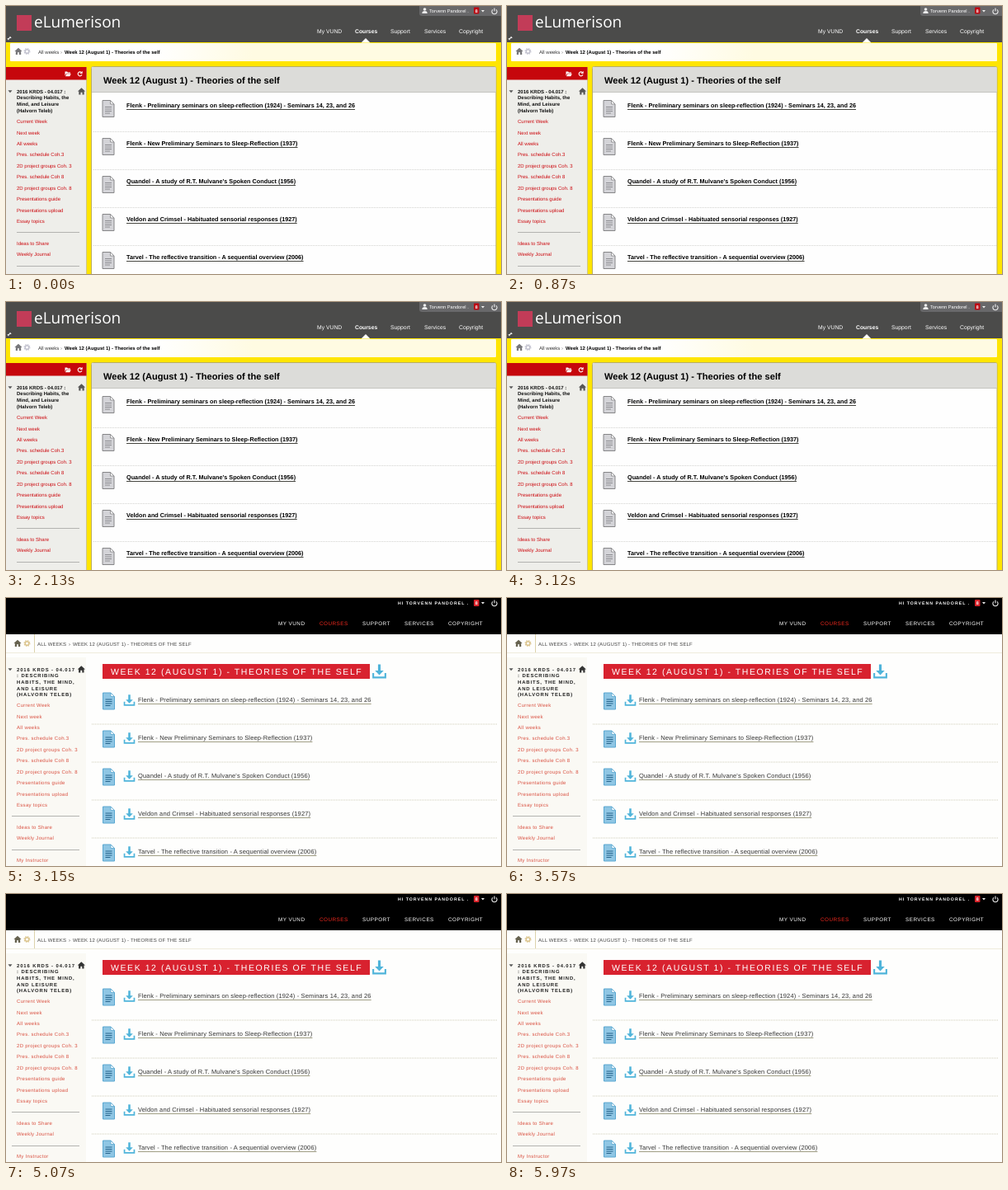
Write an HTML page that moves like this. It is 600 px wide and 325 px high and loops after 6.03 s.

```html
<!DOCTYPE html>
<html lang="en">
<head>
<meta charset="utf-8">
<title>Course page, two themes</title>
<style>
  html, body { margin: 0; width: 100%; height: 100%; overflow: hidden; background: #fff; }
  svg { display: block; width: 600px; height: 325px; }
  text { font-family: "Liberation Sans", Arial, sans-serif; text-rendering: geometricPrecision; white-space: pre; }
  .logo { font-family: "Open Sans", sans-serif; }
</style>
</head>
<body>
<svg id="stage" viewBox="0 0 600 325">
  <defs>
    <linearGradient id="crumbs"><stop offset=".3" stop-color="#fff"/><stop offset=".5" stop-color="#fffbe2"/></linearGradient>
  </defs>
  <g id="old"></g>
  <g id="fresh" visibility="hidden"></g>
</svg>
<script>
const LOOP = 6030, SWITCH = 3150;
const old = document.getElementById('old'), fresh = document.getElementById('fresh');
let layer = old;

function add(tag, attrs) {
  const el = document.createElementNS('http://www.w3.org/2000/svg', tag);
  for (const k in attrs) el.setAttribute(k, attrs[k]);
  return layer.appendChild(el);
}
const rect = (x, y, width, height, fill, more) => add('rect', { x, y, width, height, fill, ...more });
const path = (d, fill, more) => add('path', { d, fill, ...more });
const line = (d, stroke, w = 1, more) => path(d, 'none', { stroke, 'stroke-width': w, ...more });

function text(x, y, str, size, fill, bold, spacing = 0, more) {
  const el = add('text', { x, y, fill, 'font-size': size, 'font-weight': bold ? 700 : 400, 'letter-spacing': spacing, ...more });
  el.textContent = str;
  return el;
}
function link(x, y, str, size, fill, bold, spacing, rule) {
  const w = text(x, y, str, size, fill, bold, spacing).getComputedTextLength();
  line(`M${x} ${y + 2.2}h${w}`, rule, 1);
}

// Icons, placed by their centre
const at = (x, y) => ({ transform: `translate(${x} ${y})` });
const home = (x, y, c) => path('M0-4.3L4.6 0H3.2V4H1V1.2H-1V4H-3.2V0H-4.6Z', c, at(x, y));
const caret = (x, y, c, r = 2.5) => path(`M${-r} ${-r / 2}H${r}L0 ${r * .7}Z`, c, at(x, y));
function gear(x, y, c) {
  add('circle', { cx: x, cy: y, r: 2.3, fill: 'none', stroke: c, 'stroke-width': 1.6 });
  add('circle', { cx: x, cy: y, r: 3.4, fill: 'none', stroke: c, 'stroke-width': 1.2, 'stroke-dasharray': '1.4 1.27' });
}
const power = (x, y, c) => line('M-2-2.2A3.1 3.1 0 1 0 2-2.2M0-4V-.3', c, 1.1, at(x, y));
function badge(x, y, n, fill) {
  rect(x, y, 6.5, 8, fill, { rx: 1 });
  text(x + 1.8, y + 6, n, 5.4, '#fff', true);
}
function download(x, y, s) {
  path('M-1.5-8H1.5V-1H5L0 4.3L-5-1H-1.5ZM-8 2H-6V6H6V2H8V8H-8Z', '#4fb4da', { transform: `translate(${x} ${y}) scale(${s})` });
}
function sheet(x, y, fill, edge, ink) {
  path('M.5.5H10L14.5 5V20.5H.5Z', fill, { ...at(x, y), stroke: edge, 'stroke-width': 1 });
  path('M10 .5V5H14.5Z', '#fff', { ...at(x, y), stroke: edge, 'stroke-width': .8 });
  line('M3.5 8.5h8M3.5 11h8M3.5 13.5h8M3.5 16h6', ink, 1.1, at(x, y));
}

const readings = [
  'Flenk - Preliminary seminars on sleep-reflection (1924) - Seminars 14, 23, and 26',
  'Flenk - New Preliminary Seminars to Sleep-Reflection (1937)',
  "Quandel - A study of R.T. Mulvane's Spoken Conduct (1956)",
  'Veldon and Crimsel - Habituated sensorial responses (1927)',
  'Tarvel - The reflective transition - A sequential overview (2006)'
];
const menu = ['Current Week', 'Next week', 'All weeks', 'Pres. schedule Coh.3', '2D project groups Coh. 3',
  'Pres. schedule Coh 8', '2D project groups Coh. 8', 'Presentations guide', 'Presentations upload',
  'Essay topics', '-', 'Ideas to Share', 'Weekly Journal', '-', 'My Instructor'];
const tabs = ['My VUND', 'Courses', 'Support', 'Services', 'Copyright'];
const week = 'Week 12 (August 1) - Theories of the self';
const user = 'Torvenn Pandorel';

function sidebar(top, color, spacing, ruleX) {
  menu.forEach((item, i) => {
    const y = top + i * 13.42;
    if (item === '-') line(`M${ruleX} ${Math.round(y - 2) + .5}H89`, '#b3b3b0');
    else text(13, y, item, 6, color, false, spacing);
  });
}

function drawOld() {
  rect(0, 0, 600, 325, '#ffe500');

  rect(0, 0, 600, 44, '#4b4b4a');
  rect(13, 11, 18, 19, '#c23c58');
  text(34, 26.3, 'eLumerison', 19, '#fff', false, 0, { class: 'logo' });
  path('M501 0H600V12H504Q501 12 501 9Z', '#68686a');
  add('circle', { cx: 507.5, cy: 4, r: 1.8, fill: '#eee' });
  path('M504.3 9Q504.3 6 507.5 6T510.7 9Z', '#eee');
  text(513, 8.2, user + ' .', 5.7, '#fff');
  badge(567, 1.5, '8', '#bd0a14');
  caret(578, 6, '#eee', 2);
  power(592, 6.5, '#eee');
  [377, 423, 466, 507, 549].forEach((x, i) => text(x, 33, tabs[i], 6.8, '#fff', i === 1));
  path('M430.5 44.5L436 39L441.5 44.5Z', '#fff');
  line('M2.5 40.5L5.5 37.5M1.8 39.3l1.6 1.8M4.6 37l1.6 1.8', '#eee', 1.1);

  rect(5, 45, 589, 22, 'url(#crumbs)', { rx: 1 });
  home(15, 55, '#77777a');
  gear(25.5, 55, '#c4c4d0');
  text(39, 57.8, 'All weeks', 6, '#333');
  text(66, 57.8, '›', 6, '#777');
  text(71, 57.8, week, 6, '#000', true);

  rect(0, 74, 97.5, 251, '#eeeeea');
  line('M97.5 74V325', '#cfc68a');
  rect(0, 74, 97.5, 15.5, '#c6070c');
  path('M71.5 79.5h2.5l1 1h3v1.2h-5l-1.5 3zM73.5 82.3h5.3l-1.5 2.9h-5.3z', '#fff');
  line('M91.8 81A2.5 2.5 0 1 0 92 83.3', '#fff', 1.1);
  path('M92.6 78.8V82H89.6Z', '#fff');
  caret(5, 103.5, '#555');
  home(91.5, 103.5, '#555');
  ['2016 KRDS - 04.017 :', 'Describing Habits, the', 'Mind, and Leisure', '(Halvorn Teleb)']
    .forEach((s, i) => text(13, 105.7 + i * 7.6, s, 6, '#111', true));
  sidebar(142.2, '#cc0a10', 0, 13);

  rect(103.5, 73.5, 490.5, 260, '#fefefe', { stroke: '#b9ad62', rx: 2 });
  rect(104, 74, 489.5, 30.5, '#dcdcd9');
  line('M104 104.5H594', '#c4c4c0');
  text(118, 93.7, week, 11.1, '#000', true);
  readings.forEach((s, i) => {
    const y = 124 + i * 46;
    sheet(116.5, y - 10, '#d4d4d8', '#868688', '#8d8d92');
    link(146, y - .7, s, 7.28, '#000', true, 0, '#45453f');
    if (i < 4) line(`M106 ${y + 28.5}H593`, '#d3d3d0', 1, { 'stroke-dasharray': '1 1' });
  });
}

function drawFresh() {
  rect(0, 0, 600, 325, '#fefefd');

  rect(0, 0, 600, 44, '#000');
  text(475, 8, `HI ${user.toUpperCase()} .`, 5.2, '#fff', true, 1.02);
  badge(567, 2, '8', '#d8232a');
  caret(578, 6, '#eee', 2);
  power(592, 6.5, '#eee');
  [330, 380, 432, 483, 536].forEach((x, i) =>
    text(x, 33, tabs[i].toUpperCase(), 6.4, i === 1 ? '#f0281e' : '#fff', false, .45));

  line('M0 66.5H600', '#efecdc');
  line('M34.5 44V66', '#dcd2ac');
  home(14, 55, '#66624f');
  gear(25.5, 55, '#dcc690');
  text(38, 57.8, 'ALL WEEKS', 6, '#444', false, .15);
  text(76, 57.8, '›', 6, '#444');
  text(81, 57.8, week.toUpperCase(), 6, '#444', false, .15);

  rect(0, 72, 97, 253, '#faf9f4');
  caret(5, 86.5, '#555');
  home(91.3, 86.5, '#333');
  ['2016 KRDS - 04.017', ': DESCRIBING', 'HABITS, THE MIND,', 'AND LEISURE', '(HALVORN TELEB)']
    .forEach((s, i) => text(13, 88.7 + i * 7.6, s, 5.9, '#222', true, .9));
  sidebar(132.2, '#d95040', .3, 7);

  rect(117, 80, 324, 18, '#d8222f');
  text(127, 93, week.toUpperCase(), 10.5, '#fff', false, 1.57);
  download(452.5, 89, 1.05);
  readings.forEach((s, i) => {
    const y = 124 + i * 46;
    sheet(117, y - 9.5, '#8fc6e4', '#5aa7d0', '#27648c');
    download(149.5, y, .85);
    link(160, y + 2.3, s, 7.5, '#333', false, .15, '#a19f85');
    if (i < 4) line(`M104 ${y + 29}H595`, '#cfcdb8', 1, { 'stroke-dasharray': '1 1' });
  });
}

drawOld();
layer = fresh;
drawFresh();

function frame() {
  const isOld = performance.now() % LOOP < SWITCH;
  old.setAttribute('visibility', isOld ? 'visible' : 'hidden');
  fresh.setAttribute('visibility', isOld ? 'hidden' : 'visible');
  requestAnimationFrame(frame);
}
frame();
</script>
</body>
</html>
```
